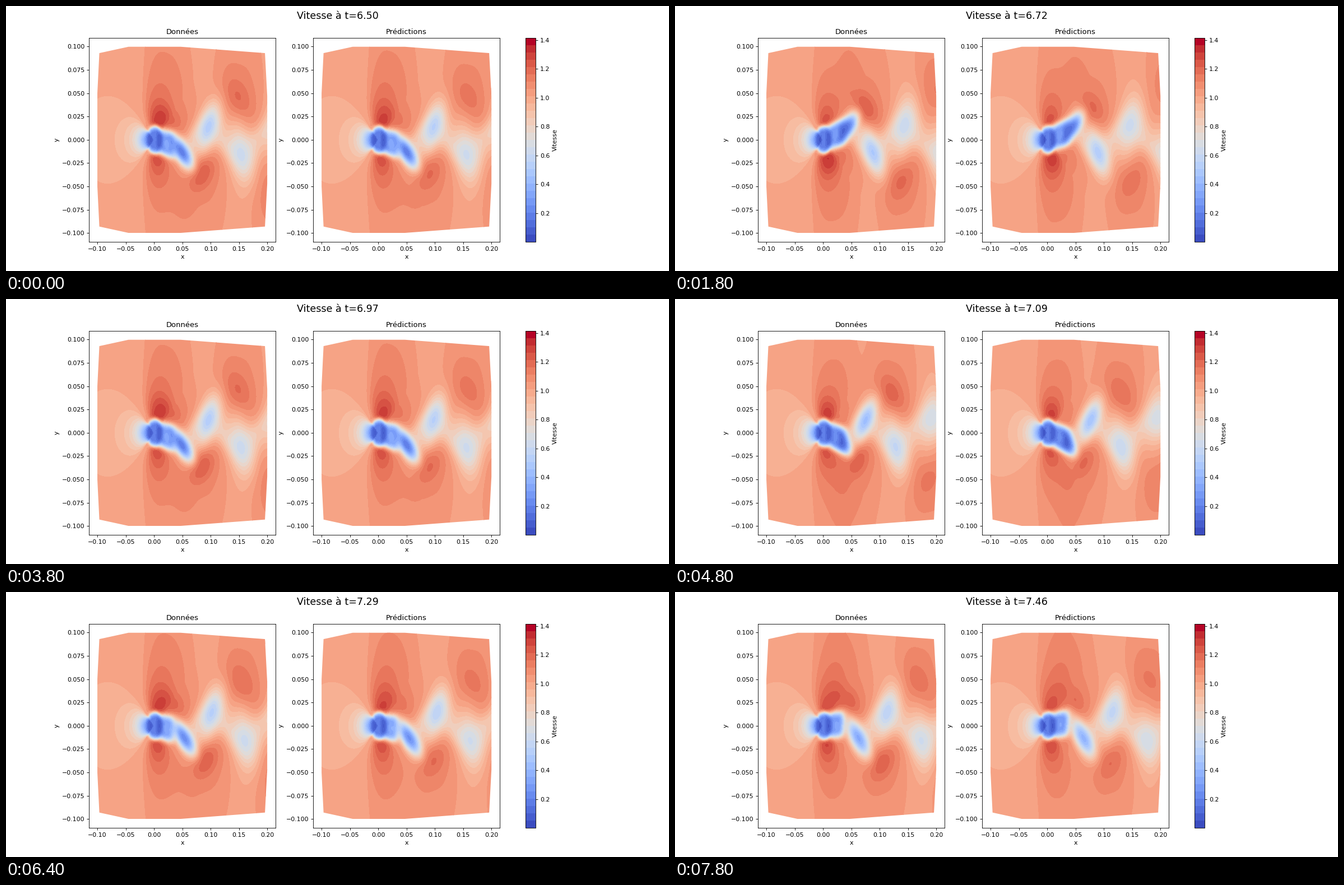
A matplotlib script that plays this animation: 1183 by 473 pixels, repeating every 8 s.

```python
import matplotlib as mpl
import matplotlib.pyplot as plt
import numpy as np
from matplotlib.animation import FuncAnimation
from matplotlib.cm import ScalarMappable
from matplotlib.colors import Normalize
from matplotlib.patches import Polygon

DPI = 1183 / 15
FRAMES, INTERVAL = 40, 200
T0, DT = 6.504, 0.0245
SHED = 3 / 19  # shedding cycles per frame
LEVELS = np.arange(0, 1.5, 0.05)
VMIN, VMAX = 0.002, 1.4155
FREE = 1.019

# Flow coordinates are in hundredths of the plotted unit.
gx = np.linspace(-10, 20, 201)
gy = np.linspace(-10, 10, 141)
X, Y = np.meshgrid(gx, gy)


def ramp(v, lo, hi):
    s = np.clip((v - lo) / (hi - lo), 0, 1)
    return s * s * (3 - 2 * s)


def step(x, width):
    return 1 / (1 + np.exp(-x / width))


def soft_cap(v, top):
    return top * np.tanh(v / top)


def dipole(x, y, soft):
    r2 = x**2 + y**2 + 1e-6
    return 3.4 * (x**2 - y**2) / (r2 * (r2 + soft * y**2 / r2))


def mean_flow():
    """Slow zone ahead of the cylinder, fast zones above and below it."""
    slow = np.where(X < 0, np.maximum(dipole(X, Y, 0), 0), 0)
    fast = 0.8 * np.maximum(-dipole(X - 0.6, Y, 6), 0)
    fast += 0.03 * np.exp(-np.abs((X - 2) / 3.8)**3)
    return soft_cap(slow, 0.75), fast * step(X + 2, 0.4)


SLOW, FAST = mean_flow()
DISK = np.exp(-(((X - 0.1)**2 + Y**2) / 1.5**2)**3)


def near_wake(phase):
    """Cylinder and the stagnant pocket that sways behind it."""
    sway = -np.cos(2 * np.pi * (phase - 0.88))
    half = 2.0 + 0.25 * np.cos(4 * np.pi * (phase - 0.33))
    y = Y - 0.25 * sway * np.maximum(X, 0)
    pocket = np.exp(-((X - half) / half)**4 - (y / 1.4)**4)
    glow = (0.08 * np.exp(-((X - 0.2) / 0.4)**2 - Y**2)
            + 0.15 * np.exp(-((X - 2.3) / 0.7)**2 - (y / 0.8)**2))
    return (1 - 0.86 * DISK) * (1 - 0.82 * pocket), glow


def fast_blobs(y, phase, gain, lead):
    """Fast lobes that leave the cylinder on the side y > 0."""
    total = np.zeros_like(X)
    for n in (-1, 0, 1):
        p = phase % 1 + n
        if p < -0.5:
            continue
        age = max(p, 0)
        xc = 0.9 + 1.3 * np.logaddexp(0, (1 + 13 * p) / 1.3) + lead * age
        yc = 2.1 + 2.9 * age - 0.6 * age**2
        dx, dy = X - xc, y - yc
        height = 1.5 + 0.6 * min(age, 1)
        core = 0.21 * np.exp(-(p - 0.4)**2 / 0.75) * np.exp(
            -((dx + 0.35 * dy) / 2.0)**2 - (dy / height)**2)
        halo = 0.10 * np.exp(-np.abs(dx / 4.2)**3 - (dy / 8)**2)
        total += (gain * ramp(p, -0.5, -0.05) * core
                  + ramp(p, -0.35, 0.3) * halo)
    return total * step(X + 1.6, 0.4)


def slow_blobs(y, phase, gain):
    """Slow cores that drift downstream on the side y > 0."""
    factor = np.ones_like(X)
    for n in (0, 1, 2):
        q = phase % 1 + n
        grow = ramp(q, 0.08, 0.35)
        if grow == 0:
            continue
        d = q - 1
        xc = 9.6 + 10.5 * d + 2 * d * d
        yc = 1.25 * ramp(q, 0, 0.45) + 0.4 * max(d, 0)
        dx, dy = X - xc, y - yc
        lean = min(0.75, 0.4 / q**1.2)
        wx = 1.55 + 0.8 * np.clip(q - 0.8, 0, 0.8)
        wy = 0.9 + 1.6 * min(q, 1.4)
        quad = ((dx - lean * dy) / wx)**2 + (dy / wy)**2
        depth = min(0.83, 0.4 / q**1.1)
        if q > 0.6:
            depth *= gain
        sharp = 1 + 0.5 * np.clip(1 - q, 0, 1)
        factor *= 1 - grow * depth * np.exp(-quad**sharp)
        skirt = np.exp(-(dx / 2.6)**2 - (dy / 5.5)**2)
        factor *= 1 - 0.05 * ramp(q, 0.5, 1.2) * skirt
    return factor


def ribbon(phase):
    """Slow band that winds between the cores."""
    x = X - 0.35 * (np.abs(Y) - 1.2)
    q = 1 + (-10.5 + np.sqrt(np.maximum(110.25 + 8 * (x - 9.6), 1))) / 4
    centre = 1.6 * np.cos(2 * np.pi * (q - phase))
    band = np.exp(-((Y - centre) / 2.1)**2)
    return 1 - 0.19 * band * step(X - 4, 0.6)


def speed(phase, fast_gain=1.0, slow_gain=1.0, lead=0.0):
    boost = (FAST + fast_blobs(Y, phase, fast_gain, lead)
             + fast_blobs(-Y, phase + 0.5, fast_gain, lead))
    body, glow = near_wake(phase)
    v = FREE - SLOW + soft_cap(boost, 0.43)
    v *= body * ribbon(phase)
    v *= slow_blobs(Y, phase, slow_gain)
    v *= slow_blobs(-Y, phase + 0.5, slow_gain)
    return np.clip(v + glow, 0.01, 1.41)


def outline():
    upper = [(-0.1, 0.05), (-0.0965, 0.093), (-0.045, 0.0998),
             (0.047, 0.0998), (0.196, 0.093), (0.2, 0.047)]
    return upper + [(x, -y) for x, y in reversed(upper)]


fig, axes = plt.subplots(1, 2, figsize=(1183 / DPI, 473 / DPI), dpi=DPI)
norm = Normalize(VMIN, VMAX)
bar_map = mpl.colormaps["coolwarm"].resampled(28)
fig.colorbar(ScalarMappable(norm, bar_map), ax=axes, label="Vitesse")
heading = fig.suptitle("", fontsize=16)

clips = []
for ax, name in zip(axes, ("Données", "Prédictions")):
    ax.set(title=name, xlabel="x", ylabel="y",
           xlim=(-0.115, 0.215), ylim=(-0.1094, 0.1094))
    clips.append(Polygon(outline(), transform=ax.transData))

shown = []


def draw(i):
    while shown:
        shown.pop().remove()
    phase = i * SHED
    fields = (speed(phase),
              speed(phase + 0.015, fast_gain=0.7, slow_gain=0.94, lead=0.8))
    for ax, clip, field in zip(axes, clips, fields):
        cs = ax.contourf(gx / 100, gy / 100, field, levels=LEVELS,
                         cmap="coolwarm", norm=norm)
        cs.set_clip_path(clip)
        shown.append(cs)
    heading.set_text(f"Vitesse à t={T0 + DT * i:.2f}")
    return shown + [heading]


anim = FuncAnimation(fig, draw, frames=FRAMES, interval=INTERVAL,
                     init_func=lambda: draw(0), repeat=True, repeat_delay=0)
plt.show()
```
